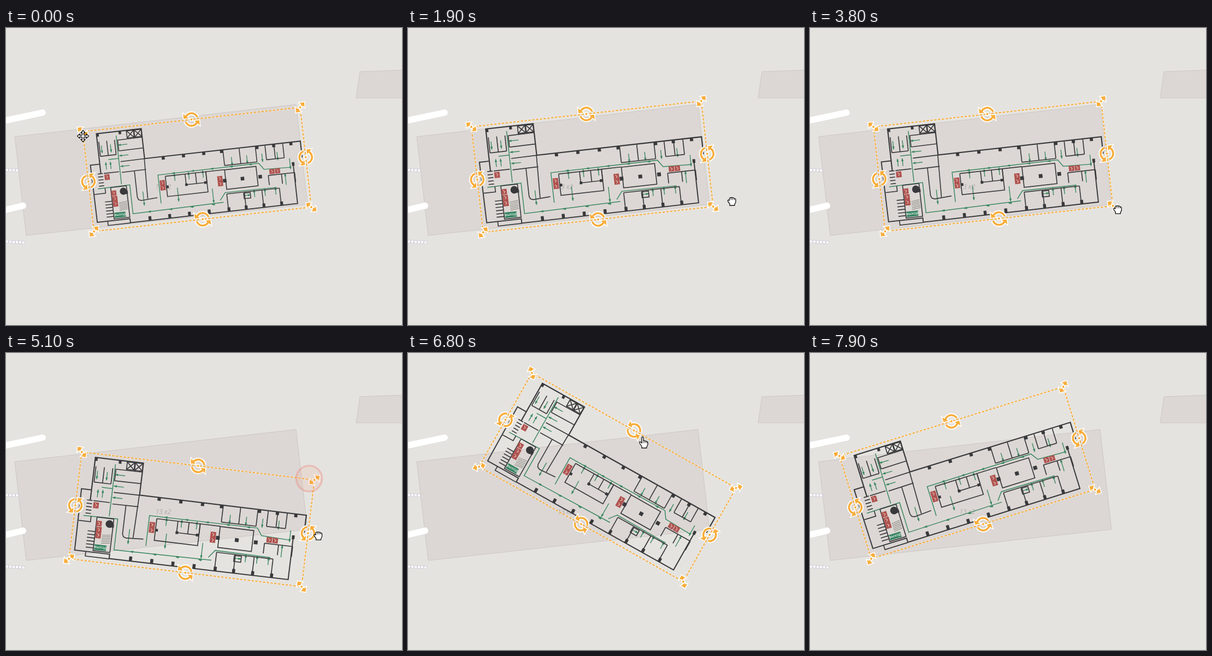
An HTML page with a canvas for the animation above (8000 ms loop, 725x544 px).

```html
<!DOCTYPE html>
<html lang="en">
<head>
<meta charset="utf-8">
<title>Floor plan placement</title>
<style>
html, body { margin: 0; width: 100%; height: 100%; overflow: hidden; background: #e5e3df; }
canvas { display: block; }
</style>
</head>
<body>
<canvas id="stage" width="725" height="544"></canvas>
<script>
const ctx = document.getElementById('stage').getContext('2d');
const LOOP = 8000, W = 429, H = 197;
const ORANGE = '#f8ad3a', WALL = '#39393c', GREEN = '#3b8761', RED = '#b0524e', PALE = '#e6cfcb';
const rad = deg => deg * Math.PI / 180;

/* ---------- helpers ---------- */
function ease(t, [from, to]) {
  const k = Math.min(1, Math.max(0, (t - from) / (to - from)));
  return k * k * (3 - 2 * k);
}
function row(count, start, step, draw) {
  for (let i = 0; i < count; i++) draw(start + i * step, i);
}
function path(pts, close) {
  ctx.beginPath();
  for (let i = 0; i < pts.length; i += 2) ctx.lineTo(pts[i], pts[i + 1]);
  if (close) ctx.closePath();
}
function stroke(color, width) {
  ctx.strokeStyle = color;
  ctx.lineWidth = width;
  ctx.stroke();
}
function fill(color) {
  ctx.fillStyle = color;
  ctx.fill();
}
function line(color, width, ...pts) {
  path(pts);
  stroke(color, width);
}
function box(x, y, w, h, color = WALL) {
  ctx.fillStyle = color;
  ctx.fillRect(x - w / 2, y - h / 2, w, h);
}
function circle(x, y, r) {
  ctx.beginPath();
  ctx.arc(x, y, r, 0, 2 * Math.PI);
}
function at(x, y, angle, draw) {
  ctx.save();
  ctx.translate(x, y);
  ctx.rotate(angle);
  draw();
  ctx.restore();
}

/* ---------- map ---------- */
function block(...pts) {
  path(pts, true);
  fill('#dcd7d4');
  stroke('#cdc8c5', 1);
}
function road(...pts) {
  ctx.lineCap = 'round';
  line('#dad8d6', 13, ...pts);
  line('#fff', 12, ...pts);
  ctx.lineCap = 'butt';
}
function footpath(...pts) {
  line('#d3d0da', 6, ...pts);
  ctx.setLineDash([4, 2]);
  line('#fff', 4, ...pts);
  ctx.setLineDash([]);
}
function drawMap() {
  ctx.fillStyle = '#e5e3df';
  ctx.fillRect(0, 0, 725, 544);
  block(16, 199, 531, 140, 552, 323, 37, 380);
  block(648, 80, 727, 77, 727, 128, 641, 128);
  road(-9, 171, 67, 155);
  road(-9, 335, 31, 325.5);
  footpath(0, 260, 24, 261);
  footpath(0, 391, 35, 393);
  ctx.font = 'italic 12px "Noto Sans", sans-serif';
  ctx.textAlign = 'center';
  ctx.textBaseline = 'middle';
  ctx.fillStyle = '#b4afad';
  ctx.fillText('13 к2', 288, 291.5);
}

/* ---------- floor plan, drawn in a W x H space ---------- */
const wall = (...pts) => line(WALL, 1.7, ...pts);

// A row of equal rooms: dividers hang between the back wall and the front.
function rooms(x0, x1, back, front, count) {
  wall(x0, front, x1, front);
  row(count + 1, x0, (x1 - x0) / count, x => wall(x, back, x, front));
}
function hall(x, y, w, h) {
  wall(x, y, x + w, y, x + w, y + h, x, y + h, x, y);
}
function arrow(x0, y0, x1, y1) {
  line(GREEN, 1.4, x0, y0, x1, y1);
  at(x1, y1, Math.atan2(y1 - y0, x1 - x0), () => {
    path([1, 0, -5, -2.2, -5, 2.2], true);
    fill(GREEN);
  });
}
function sign(x, y, h) {
  box(x, y, 10, h, RED);
  row(Math.round(h / 10), y - h / 2 + 5, 10, cy => line(PALE, 1, x - 2, cy - 3, x + 1.5, cy, x - 1, cy + 3));
}

function drawWalls() {
  line(WALL, 2.2, 26, 86, 26, 7, 114.5, 7, 114.5, 66, 422, 66, 422, 98);
  line(WALL, 2, 26, 67, 7.5, 67, 8.5, 180, 73, 180, 73, 188, 403, 187, 403, 110);
  wall(29, 180, 29, 188.5, 73, 188.5);

  // West wing
  rooms(29, 60, 23, 52, 2);
  row(4, 46, 14, y => wall(66, y < 60 ? y - 23 : y, 66, y));
  row(4, 24, 21.3, y => wall(67, y, 115, y - 0.5));
  row(2, 85, 15, x => {
    hall(x, 8, 14, 14);
    wall(x, 8, x + 14, 22);
    wall(x + 14, 8, x, 22);
  });
  wall(92, 88, 92, 140, 94, 145, 99, 147, 131, 145);
  wall(114, 66, 112, 145);
  wall(32, 86, 62, 86);
  wall(9, 125, 31, 125, 31, 115);
  hall(42, 115, 31, 62);
  row(5, 86, 6, y => wall(20, y, 30, y));
  row(6, 142, 6, y => wall(28, y, 42, y));
  row(6, 147, 3, y => line('#85857f', 1, 55, y, 71, y - 2));

  // Middle
  hall(151, 105, 80, 40);
  rooms(190, 231, 105, 126, 2);
  wall(231, 105, 268, 105);
  hall(268, 105.5, 62, 38.5);

  // East wing
  rooms(269, 333, 67, 97, 2);
  rooms(352, 387, 67, 95, 2);
  rooms(352, 404, 145, 126, 2);
  rooms(267, 371, 184, 153, 3);
  hall(300, 155, 13, 11);
}

function drawPillars() {
  const top = x => box(x, 69, 6, 6), bottom = x => box(x, 183.5, 5.5, 8);
  row(3, 151, 40, top);
  row(2, 266, 70, top);
  row(2, 369, 34, top);
  row(5, 112, 39, bottom);
  row(3, 302, 35, bottom);
  row(2, 28, 44, x => box(x, 10, 5, 6));
  row(3, 266, 35, x => box(x, 126.5, 7, 7));
  row(3, 153, 37.5, x => box(x, 126, 5, 5));
  box(403, 109, 5, 7);
  circle(66, 125, 7);
  fill(WALL);
  box(71, 128, 7, 6);
}

function drawRoutes() {
  const route = (...pts) => line(GREEN, 1.5, ...pts);
  route(64, 15, 64, 111);
  route(17, 115, 80, 114, 80, 171, 259, 168.5);
  route(137, 157, 137, 101, 336, 100, 345, 113, 398, 115);
  route(253, 164, 264, 150, 366, 151);
  route(44, 60, 64, 60);
  row(4, 116, 42, x => arrow(x, 170.5, x - 6, 170.5));
  row(5, 171, 38, x => arrow(x, 100.6, x - 6, 100.6));
  row(2, 33, 18, x => arrow(x, 31, x, 46));
  row(2, 38, 9, x => arrow(x, 79, x, 65));
  row(3, 34, 21, y => arrow(84, y, 66, y));
  row(3, 104, 68, x => arrow(x, x > 200 ? 139 : 130, x, x > 200 ? 167 : 157));
  row(3, 169, 28, x => arrow(x, 116, x, 102));
  row(4, 284, 30, x => arrow(x, 82, x, 98));
  row(3, 321, 21, x => arrow(x, 165, x, 151));
  row(2, 385, 12, (x, i) => arrow(x, i ? 97 : 148, x, i ? 118 : 126));
  arrow(299, 160, 313, 160);
}

function drawPlan() {
  drawRoutes();
  drawWalls();
  drawPillars();
  sign(37.5, 94, 11);
  sign(47, 126.5, 10);
  sign(48, 143, 21);
  sign(144, 122, 20);
  sign(257, 126.5, 20);
  row(2, 360, 11, x => sign(x, 119, 10));
  box(54.5, 170, 22, 10, '#2f7f5b');
  ctx.font = 'bold 6px "Open Sans", sans-serif';
  ctx.fillStyle = '#d8e8df';
  ctx.fillText('ВЫХОД', 54.5, 170.3);
}

/* ---------- handles ---------- */
// Each glyph is half a handle, drawn twice: white halo first, then orange.
function handle([x, y], angle, half) {
  at(x, y, angle, () => {
    for (const [color, halo] of [['#fff', 3], [ORANGE, 0]]) {
      for (let i = 0; i < 2; i++) {
        half(color, halo);
        ctx.rotate(Math.PI);
      }
      circle(0, 0, 2 + halo / 2);
      fill(color);
    }
  });
}
function turnGlyph(color, halo) {
  ctx.beginPath();
  ctx.arc(0, 0, 11.5, rad(215), rad(345));
  stroke(color, 3.5 + halo * 1.2);
  path([-14, -12, -14, -3, -5, -3], true);
  if (halo) stroke(color, halo);
  fill(color);
}
function sizeGlyph(color, halo) {
  path([12, 0, 5.5, -6, 5.5, -2, 4, -2, 4, 2, 5.5, 2, 5.5, 6], true);
  if (halo) stroke(color, halo);
  fill(color);
}

/* ---------- motion ---------- */
const WIDEN = [200, 1000], SHRINK = [2200, 2800], GROW = [3050, 3976];
const TURN = [[4540, 5160], [5960, 6540], [6980, 7940]];

const boxWidth = t => 400.4 + 23.2 * ease(t, WIDEN) - 96 * ease(t, SHRINK) + 101.4 * ease(t, GROW);
const boxAngle = t => rad(-6.4 + 13.6 * ease(t, TURN[0]) + 22.2 * ease(t, TURN[1]) - 46.8 * ease(t, TURN[2]));

// Until `end`, the point (u, v) of the box stays pinned at (x, y).
const PINS = [
  { end: 1200, u: 1, v: 1, x: 559, y: 328 },
  { end: 4300, u: 0, v: 0, x: 116, y: 181 },
  { end: 5800, u: 0, v: 0.5, x: 127, y: 279 },
  { end: 6750, u: 1, v: 0.5, x: 552, y: 333 },
  { end: LOOP, u: 0.5, v: 1, x: 317, y: 313.5 }
];

// Pointer hops: time span and destination.
const HOPS = [
  [WIDEN, 116, 189], [[1300, 1850], 593, 317], [[1950, 2180], 556, 332],
  [SHRINK, 441, 266], [GROW, 576, 339], [[4150, 4450], 555, 230],
  [TURN[0], 572, 337], [[5350, 5800], 127, 279], [TURN[1], 178, 124],
  [[6560, 6780], 431, 163], [TURN[2], 257, 126]
];
function pointer(t) {
  let x = 141, y = 198;
  for (const [span, toX, toY] of HOPS) {
    const k = ease(t, span);
    x += (toX - x) * k;
    y += (toY - y) * k;
  }
  return [x, y];
}

function drawBox(t) {
  const pin = PINS.find(p => t < p.end);
  const w = boxWidth(t), h = w * H / W, angle = boxAngle(t);
  const c = Math.cos(angle), s = Math.sin(angle);
  const place = (u, v) => {
    const dx = (u - pin.u) * w, dy = (v - pin.v) * h;
    return [pin.x + dx * c - dy * s, pin.y + dx * s + dy * c];
  };
  at(...place(0, 0), angle, () => {
    ctx.scale(w / W, w / W);
    drawPlan();
  });
  const corners = [[0, 0], [1, 0], [1, 1], [0, 1]];
  path(corners.flatMap(p => place(...p)), true);
  stroke('rgba(255,255,255,.3)', 3);
  ctx.setLineDash([4.5, 2.5]);
  stroke(ORANGE, 2);
  ctx.setLineDash([]);
  for (const [u, v] of corners) handle(place(u, v), angle + rad(u === v ? 45 : -45), sizeGlyph);
  for (const side of [0, 1]) {
    handle(place(0.5, side), angle, turnGlyph);
    handle(place(side, 0.5), angle + Math.PI / 2, turnGlyph);
  }
}

function drawPresses(t) {
  for (const [start] of [SHRINK, ...TURN]) {
    const age = (t - start) / 700;
    if (age < 0 || age > 1) continue;
    circle(...pointer(start), 6 + 22 * age);
    fill(`rgba(240,150,125,${0.16 * age})`);
    stroke(`rgba(243,84,76,${0.95 * (1 - age) + 0.05})`, 1 + 3 * age);
  }
}

/* ---------- pointers ---------- */
function outlined(d) {
  const shape = new Path2D(d);
  ctx.lineJoin = 'round';
  ctx.fillStyle = '#fff';
  ctx.fill(shape);
  ctx.strokeStyle = '#111';
  ctx.lineWidth = 1.3;
  ctx.stroke(shape);
}
function moveHand() {
  for (let i = 0; i < 4; i++) {
    outlined('M-1.5-1.5V-6H-4L0-10.5 4-6H1.5V-1.5');
    ctx.rotate(Math.PI / 2);
  }
  box(0, 0, 3, 3, '#fff');
}
function gripHand() {
  outlined('M-4 8V5L-7 1Q-8.5-2-6-2L-4.5-1V-5Q-3-7.5-1.5-5.5Q0-8 1.5-5.5Q3.5-7 4.5-4.5Q7-5 7-2.5V2L5 6V8Z');
  row(3, -1.5, 3, x => line('#111', 1, x, -5, x, -2));
}
function pointHand() {
  outlined('M-3 11V8L-7 2Q-8-1-5 0L-3 2V-8Q-1.5-11 0-8V-2Q2-3.5 3-1.5Q5-2.5 6-.5Q8-1 8 1.5V5L6 9V11Z');
  row(3, 0, 3, x => line('#111', 1, x, -1, x, 2));
}
function drawPointer(t) {
  if (t > 7750) return;
  const hovering = t > 6640 && t < TURN[2][0];
  at(...pointer(t), 0, t < 1250 ? moveHand : hovering ? pointHand : gripHand);
}

const begin = performance.now();
function frame() {
  const t = (performance.now() - begin) % LOOP;
  drawMap();
  drawBox(t);
  drawPresses(t);
  drawPointer(t);
  requestAnimationFrame(frame);
}
frame();
</script>
</body>
</html>
```
